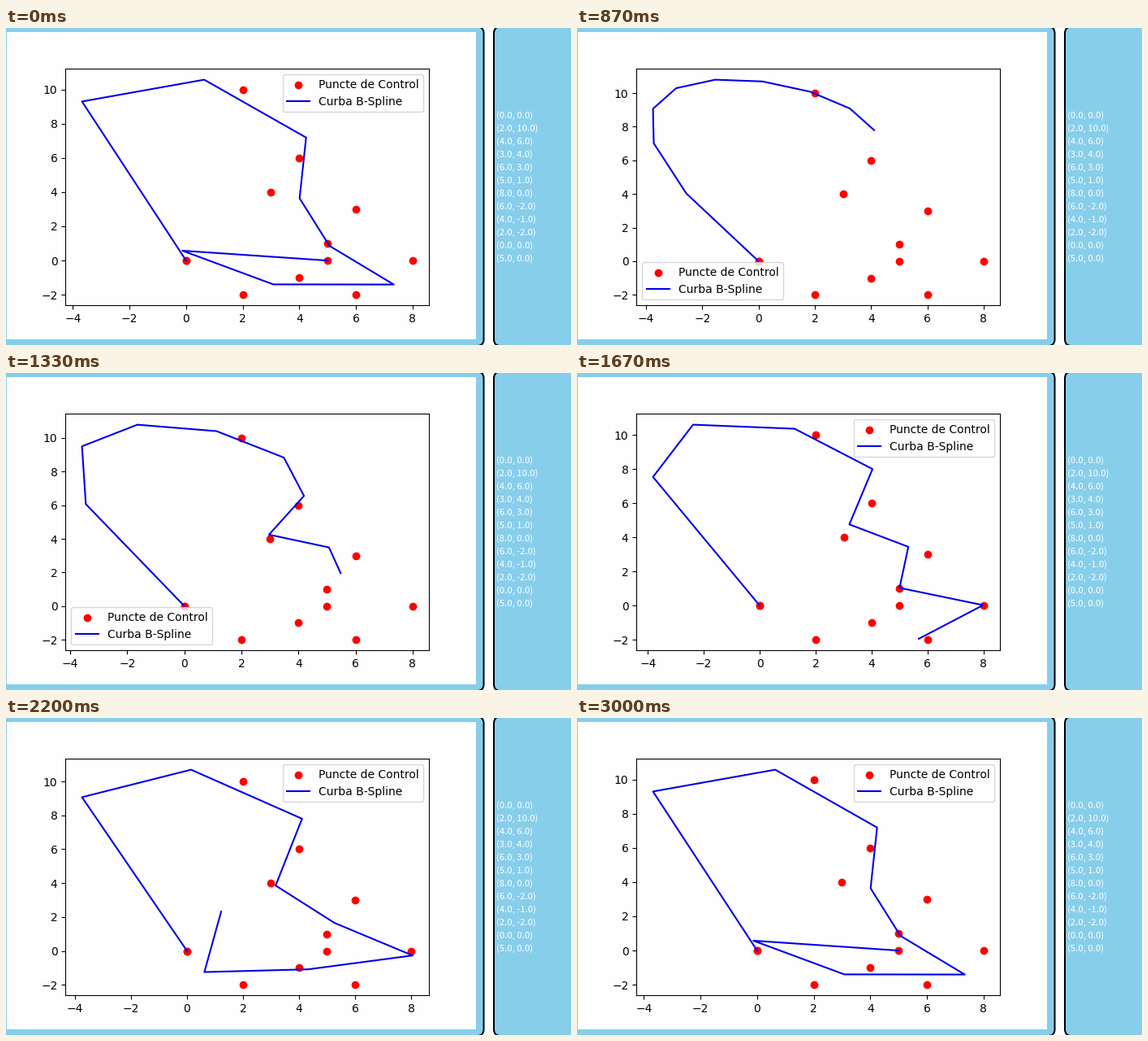
Write a matplotlib script that moves like this. It is 696 px wide and 390 px high and loops after 3.13 s.

```python
import numpy as np
import matplotlib.pyplot as plt
from matplotlib.animation import FuncAnimation
from matplotlib.patches import FancyBboxPatch, Rectangle

W, H, DPI = 696, 390, 100
LOOP_MS, FRAMES = 3130, 94
STEPS, SAMPLES = 44, 10
PAPER, PANEL = "#fefefe", "skyblue"

POINTS = np.array([(0, 0), (2, 10), (4, 6), (3, 4), (6, 3), (5, 1), (8, 0),
                   (6, -2), (4, -1), (2, -2), (0, 0), (5, 0)], float)

plt.rcParams.update({"axes.facecolor": PAPER, "font.family": "DejaVu Sans"})

# Interpolating cubic spline over chord length, not-a-knot at both ends.
chords = np.hypot(*np.diff(POINTS, axis=0).T)
params = np.concatenate([[0], np.cumsum(chords)]) / chords.sum()


def basis(u):
    powers = [u**p for p in range(4)]
    hinges = [np.maximum(u - knot, 0)**3 for knot in params[2:-2]]
    return np.stack(powers + hinges, axis=-1)


coefs = np.linalg.solve(basis(params), POINTS)


def curve(end):
    return basis(np.linspace(0, end, SAMPLES)) @ coefs


def step_at(ms):
    """Redraw count: the finished curve rests, then is traced again."""
    if ms < 165:
        return STEPS
    return int(np.interp(ms, [165, 850, 1300, 1655, 1980, 2265],
                         [0, 14, 23, 31, 38, STEPS]))


fig = plt.figure(figsize=(W / DPI, H / DPI), dpi=DPI, facecolor=PAPER)

window = fig.add_axes([0, 0, 1, 1], zorder=-1)
window.set(xlim=(0, W), ylim=(H, 0))
window.axis("off")


def panel(x0, x1):
    window.add_patch(FancyBboxPatch(
        (x0, -1.5), x1 - x0, H + 2.5, boxstyle="round,pad=0,rounding_size=8",
        fc=PANEL, ec="black", lw=2 * 72 / DPI))


panel(-30, 588.5)
panel(601, W + 30)

# Embedded plot canvas and its default subplot margins.
cx, cy, cw, ch = 1, 5, 578, 378
window.add_patch(Rectangle((cx, cy), cw, ch, fc=PAPER, ec="none"))

for row, (px, py) in enumerate(POINTS):
    window.text(604, 111 + 16 * row, f"({px:.1f}, {py:.1f})", color="white",
                family="Noto Sans CJK JP", size=11.3 * 72 / DPI, va="baseline")

ax = fig.add_axes([(cx + 0.125 * cw) / W, (H - cy - 0.89 * ch) / H,
                   0.775 * cw / W, 0.77 * ch / H])


def draw(frame):
    # Sample mid-frame so each picture stands for its whole interval.
    step = step_at((frame + 0.5) * LOOP_MS / FRAMES)
    ax.clear()
    ax.scatter(*POINTS.T, color="red", label="Puncte de Control")
    ax.plot(*curve(step / STEPS).T, color="#0000e8", label="Curba B-Spline")
    ax.legend(loc="best")
    return []


anim = FuncAnimation(fig, draw, frames=FRAMES, init_func=lambda: [],
                     interval=LOOP_MS / FRAMES, repeat=True, repeat_delay=0)
plt.show()
```
